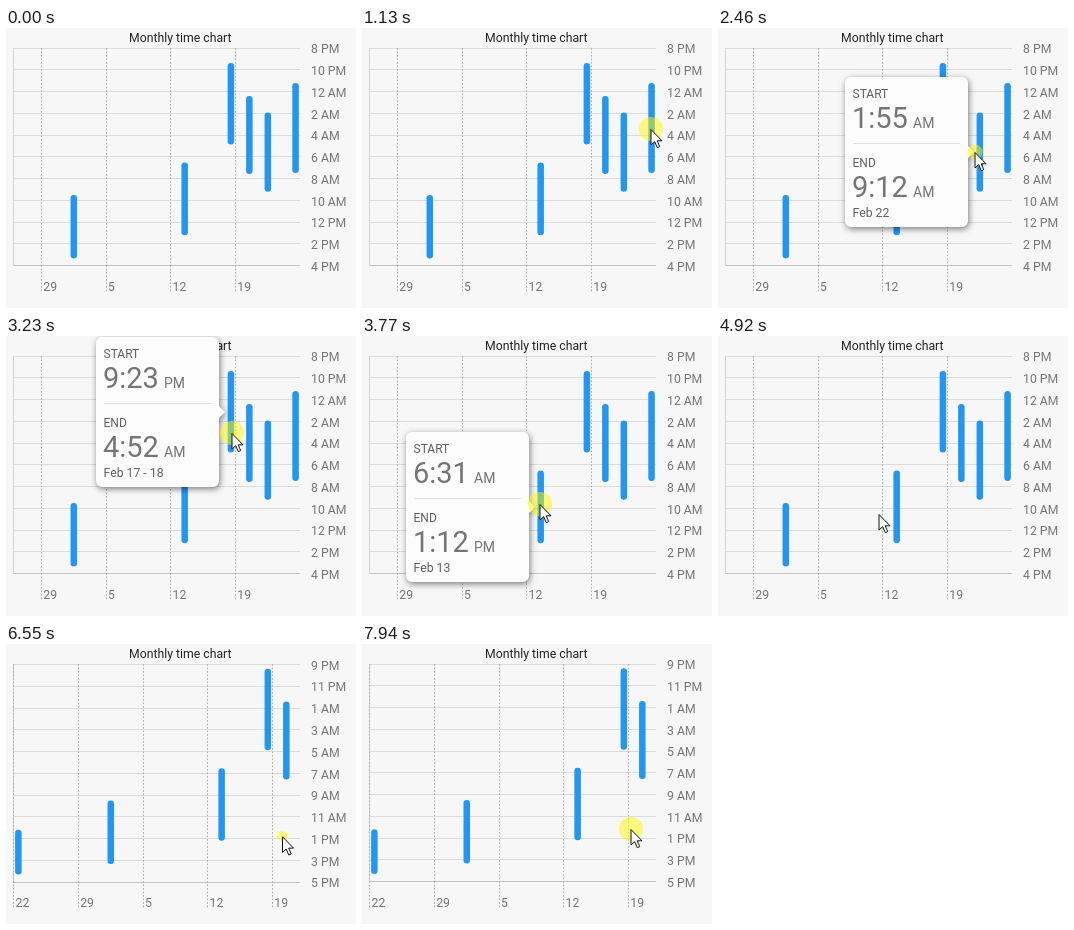
An HTML page with a canvas that plays this animation: 350 by 280 pixels, repeating every 8 s.

```html
<!DOCTYPE html>
<html lang="en">
<head>
<meta charset="utf-8">
<title>Monthly time chart</title>
<style>
  html, body { margin: 0; width: 100%; height: 100%; overflow: hidden; background: #f7f7f7; }
  canvas { display: block; width: 350px; height: 280px; }
</style>
</head>
<body>
<canvas id="stage"></canvas>
<script>
const canvas = document.getElementById('stage');
const ctx = canvas.getContext('2d');
const ratio = window.devicePixelRatio || 1;
canvas.width = 350 * ratio;
canvas.height = 280 * ratio;

const LOOP = 8000;
const LEFT = 7, RIGHT = 294, TOP = 20, BOTTOM = 238;
const DAY = 9.24, HOUR = 10.885;
const LABEL = 12.25;

// Day of February, then start and end in hours after 8 PM.
const bars = [
  [-9, 16.17, 20.3], [1, 13.5, 19.33], [13, 10.52, 17.2], [18, 1.383, 8.867],
  [20, 4.4, 11.57], [22, 5.917, 13.2], [25, 3.217, 11.483]
];

// Where the pointer rests and when it arrives. A stop with a day taps that bar
// and opens its card; day null closes the card; drag keeps the press while moving.
const stops = [
  { at: 0, x: 260, y: 295 },
  { at: 670, x: 289, y: 101, day: 25, press: 1130, open: 1680 },
  { at: 2390, x: 257, y: 124, day: 22 },
  { at: 2770, x: 239, y: 112, day: 20 },
  { at: 3150, x: 226, y: 97, day: 18 },
  { at: 3690, x: 178, y: 168, day: 13 },
  { at: 4690, x: 161, y: 178, day: null, open: 4460 },
  { at: 5530, x: 212, y: 203, drag: true },
  { at: 5990, x: 268, y: 188 },
  { at: 6230, x: 254, y: 189 },
  { at: 6610, x: 281, y: 193, drag: true },
  { at: 7010, x: 276, y: 190 },
  { at: 7470, x: 272, y: 185 },
  { at: 7790, x: 269, y: 185, press: 7790 }
];

// Each move fills the last part of the gap before its stop.
stops.forEach((stop, i) => {
  const gap = i ? stop.at - stops[i - 1].at : 0;
  stop.start = stop.at - Math.min(450, gap * 0.6);
  stop.open ??= stop.at;
  if (stop.day) stop.press ??= stop.at;
  if (stop.drag) stop.press = stop.start;
});
stops.forEach((stop, i) => {
  stop.release = stop.drag ? stop.at : stops[i + 1]?.start ?? Infinity;
});

const progress = (t, from, to) => Math.min(1, Math.max(0, (t - from) / (to - from)));
const smooth = p => p * p * (3 - 2 * p);
const easeOut = p => 1 - (1 - p) ** 2;

function text(str, x, y, size = LABEL, color = '#757575', align = 'left') {
  ctx.font = `${size}px Roboto, sans-serif`;
  ctx.fillStyle = color;
  ctx.textAlign = align;
  ctx.fillText(str, x, y);
}

function line(x1, y1, x2, y2, color, dash = []) {
  ctx.strokeStyle = color;
  ctx.lineWidth = 1;
  ctx.setLineDash(dash);
  ctx.beginPath();
  ctx.moveTo(x1, y1);
  ctx.lineTo(x2, y2);
  ctx.stroke();
  ctx.setLineDash([]);
}

function clipped(x, y, w, h, draw) {
  ctx.save();
  ctx.beginPath();
  ctx.rect(x, y, w, h);
  ctx.clip();
  draw();
  ctx.restore();
}

const dayX = (day, scroll) => 229.5 + (day - 19) * DAY + scroll;
const crisp = v => Math.floor(v) + 0.5;

function clock(hours) {
  const minutes = Math.round((hours + 20) * 60) % 1440;
  const hour = Math.floor(minutes / 60);
  return [`${hour % 12 || 12}:${String(minutes % 60).padStart(2, '0')}`, hour < 12 ? 'AM' : 'PM'];
}

function drawChart(scroll, firstHour, slide) {
  text('Monthly time chart', 174.3, 14, LABEL, '#222', 'center');

  for (let i = 0; i <= 10; i++) {
    const y = TOP + i * 2 * HOUR + slide;
    line(LEFT, crisp(y), RIGHT, crisp(y), i === 10 ? '#c4c4c4' : '#dcdcdc');
    const hour = (firstHour + 2 * i) % 24;
    text(`${hour % 12 || 12} ${hour < 12 ? 'AM' : 'PM'}`, 305, y + 5.2);
  }
  line(LEFT + 0.5, TOP, LEFT + 0.5, BOTTOM, '#d4d4d4');

  clipped(LEFT, TOP, RIGHT - LEFT, 250, () => {
    for (let day = -9; day <= 19; day += 7) {
      const x = dayX(day, scroll);
      line(crisp(x), TOP, crisp(x), 265, '#adadad', [1.75, 1.75]);
      text(new Date(2021, 1, day).getDate(), x + 1.8, 263.3);
    }
  });

  clipped(LEFT, TOP, RIGHT - LEFT, BOTTOM - TOP, () => {
    const offset = TOP + slide - (firstHour - 20) * HOUR;
    ctx.fillStyle = '#2196f3';
    for (const [day, start, end] of bars) {
      ctx.beginPath();
      ctx.roundRect(dayX(day + 0.5, scroll) - 3.25, offset + start * HOUR, 6.5, (end - start) * HOUR, 3.25);
      ctx.fill();
    }
  });
}

function drawCard(day) {
  const [, start, end] = bars.find(bar => bar[0] === day);
  const x = Math.round(dayX(day + 0.5, 0) - 134.8);
  const middle = Math.round(TOP + (start + end) / 2 * HOUR);
  const y = middle - 75;
  const right = x + 123;

  ctx.save();
  ctx.shadowColor = 'rgba(0,0,0,.5)';
  ctx.shadowBlur = 6 * ratio;
  ctx.shadowOffsetX = ratio;
  ctx.shadowOffsetY = 2 * ratio;
  ctx.fillStyle = '#fcfcfc';
  ctx.beginPath();
  ctx.roundRect(x, y, 123, 150, 6);
  ctx.moveTo(right, middle - 6);
  ctx.lineTo(right + 6, middle);
  ctx.lineTo(right, middle + 6);
  ctx.fill();
  ctx.restore();

  const block = (title, hours, top) => {
    const [time, half] = clock(hours);
    text(title, x + 7.5, top, 12, '#616161');
    text(time, x + 7, top + 30, 29);
    text(half, x + 68, top + 30, 14);
  };
  block('START', start, y + 20.5);
  line(x + 8, y + 66.5, right - 8, y + 66.5, '#e0e0e0');
  block('END', end, y + 90);
  text(start < 4 ? `Feb ${day - 1} - ${day}` : `Feb ${day}`, x + 7.5, y + 140, LABEL, '#616161');
}

const arrow = new Path2D('M0 .5V16L3.7 12.7L6.3 18.7L8.7 17.6L6.2 11.8H11Z');

function drawPointer(t) {
  const { x, y } = stops.reduce((from, to) => {
    const p = smooth(progress(t, to.start, to.at));
    return { x: from.x + (to.x - from.x) * p, y: from.y + (to.y - from.y) * p };
  }, stops[0]);

  const pressed = stops.find(stop => t >= stop.press && t < stop.release);
  if (pressed) {
    ctx.fillStyle = 'rgba(255,250,0,.5)';
    ctx.beginPath();
    ctx.arc(x, y, 12 * Math.min(1, (pressed.release - t) / 130), 0, 2 * Math.PI);
    ctx.fill();
  }
  ctx.save();
  ctx.translate(x, y);
  ctx.fillStyle = '#fff';
  ctx.strokeStyle = '#111';
  ctx.fill(arrow);
  ctx.stroke(arrow);
  ctx.restore();
}

function render() {
  const t = performance.now() % LOOP;
  ctx.setTransform(ratio, 0, 0, ratio, 0, 0);
  ctx.fillStyle = '#f7f7f7';
  ctx.fillRect(0, 0, 350, 280);

  const scroll = 4 * DAY * smooth(progress(t, 4990, 5610));
  const shifted = t >= 6380;
  const slide = shifted ? HOUR * (1 - easeOut(progress(t, 6340, 6610))) : 0;
  drawChart(scroll, shifted ? 21 : 20, slide);

  const latest = stops.filter(stop => stop.day !== undefined && t >= stop.open).pop();
  if (latest?.day) drawCard(latest.day);
  drawPointer(t);
  requestAnimationFrame(render);
}
render();
</script>
</body>
</html>
```
